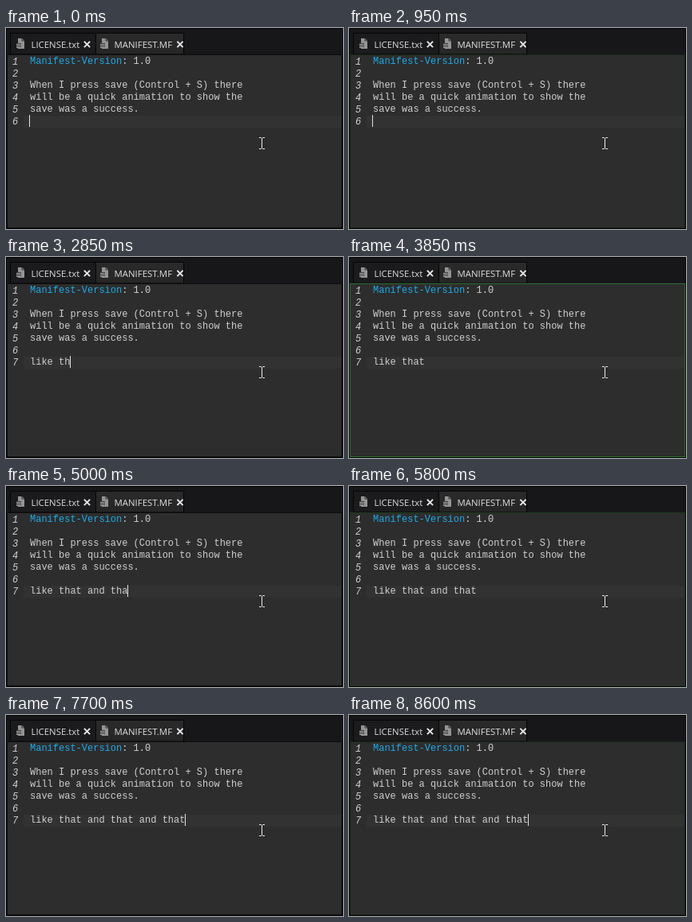
An HTML page for the animation above (8.65 s loop, 422 by 252 pixels).

```html
<!DOCTYPE html>
<html lang="en">
<head>
<meta charset="utf-8">
<title>Save animation</title>
<style>
  html, body { margin: 0; width: 100%; height: 100%; overflow: hidden; background: #111; }
  svg { display: block; width: 422px; height: 252px; }
  text { white-space: pre; }
  .code { font: 12px "Liberation Mono", "Courier New", monospace; fill: #cfcfcf; }
  .key { fill: #1fa9e6; }
  .num { font: italic 12px "Liberation Mono", "Courier New", monospace; fill: #d0d0d0; }
  .tab { font: 11.4px "Open Sans", "Noto Sans", sans-serif; fill: #dedede; }
</style>
</head>
<body>
<svg viewBox="0 0 422 252" xmlns="http://www.w3.org/2000/svg">
  <defs>
    <linearGradient id="tabFill" x1="0" y1="0" x2="0" y2="1">
      <stop offset="0" stop-color="#2b2a2b"/>
      <stop offset="1" stop-color="#272627"/>
    </linearGradient>
    <g id="doc">
      <path d="M2 0H7L10 3V13H2Z" fill="#949494"/>
      <path d="M7 0V3H10" fill="none" stroke="#333"/>
      <path d="M0 6.5H6M0 8.5H6M0 10.5H6" stroke="#333"/>
      <path d="M0 7.5H5M0 9.5H5M0 11.5H5" stroke="#b0b0b0"/>
    </g>
    <path id="close" d="M-3.6 -3.6L3.6 3.6M3.6 -3.6L-3.6 3.6" stroke="#e6e6e6" stroke-width="2"/>
  </defs>

  <rect width="422" height="252" fill="#17171a"/>
  <path d="M5.5 33V6.5H112.5V33Z" fill="#1b1b1d" stroke="#050505"/>
  <path d="M112.5 33V6.5H222.5V33Z" fill="url(#tabFill)" stroke="#050505"/>
  <use href="#doc" x="13" y="13"/>
  <use href="#doc" x="118" y="13"/>
  <text class="tab" x="31.5" y="24.5">LICENSE.txt</text>
  <text class="tab" x="135.5" y="24.5">MANIFEST.MF</text>
  <use href="#close" x="101.5" y="20.5"/>
  <use href="#close" x="218" y="20.5"/>

  <rect x="1" y="33" width="420" height="218" fill="#2d2d2d"/>
  <rect id="row" x="22" width="398" height="15" fill="#323232"/>
  <g id="nums"></g>
  <text class="code" x="30" y="45"><tspan class="key">Manifest-Version</tspan>: 1.0</text>
  <text class="code" x="30" y="75">When I press save (Control + S) there</text>
  <text class="code" x="30" y="90">will be a quick animation to show the</text>
  <text class="code" x="30" y="105">save was a success.</text>
  <text class="code" id="typed" x="30" y="135"></text>
  <rect id="caret" width="1" height="15" fill="#e4e4e4"/>

  <rect x=".5" y=".5" width="421" height="251" fill="none" stroke="#060606"/>
  <rect x="1.5" y="33.5" width="419" height="217" fill="none" stroke="#0c0c0c"/>
  <rect id="glow" x="1.5" y="33.5" width="419" height="217" fill="none" stroke="#348238"/>

  <path d="M317 137.5H319.5L320.5 138.5L321.5 137.5H324M320.5 138V151M317 151.5H319.5L320.5 150.5L321.5 151.5H324"
        fill="none" stroke="#eee"/>
</svg>
<script>
const LOOP = 8650, TICK = 50, CHAR = 7.2, BLINK = 500, ENTER = 1950;
const PHRASE = "like that and that and that";
// time at which each character of the phrase is typed
const KEYS = [
  2200, 2300, 2400, 2500, 2650, 2750, 2850, 2950, 3100,
  4300, 4400, 4550, 4650, 4750, 4850, 4900, 5000, 5100,
  6350, 6550, 6700, 6800, 6900, 7000, 7100, 7250, 7450
];
const SAVES = [900, 3550, 5700, 8100], SAVE_TIME = 650, PEAK = 0.4;

const el = id => document.getElementById(id);
const set = (id, attr, value) => el(id).setAttribute(attr, value);

for (let n = 1; n <= 7; n++) {
  const label = document.createElementNS("http://www.w3.org/2000/svg", "text");
  label.setAttribute("class", "num");
  label.setAttribute("x", 8);
  label.setAttribute("y", 31 + n * 15);
  label.textContent = n;
  el("nums").append(label);
}

function saveLevel(t) {
  const start = SAVES.find(s => t >= s && t < s + SAVE_TIME);
  if (start === undefined) return 0;
  const u = (t - start) / SAVE_TIME;
  return u < PEAK ? u / PEAK : ((1 - u) / (1 - PEAK)) ** 1.7;
}

function caretOn(t, count) {
  const lastKey = count ? KEYS[count - 1] : t >= ENTER ? ENTER : -250;
  return Math.floor((t - lastKey) / BLINK) % 2 === 0;
}

function draw(time) {
  const t = Math.floor((time % LOOP) / TICK) * TICK;
  const count = KEYS.filter(k => k <= t).length;
  const line = t < ENTER ? 6 : 7;
  const top = 20 + line * 15;

  el("typed").textContent = PHRASE.slice(0, count);
  el("nums").lastChild.setAttribute("opacity", line === 7 ? 1 : 0);
  set("row", "y", top);
  set("caret", "x", Math.floor(29.6 + count * CHAR));
  set("caret", "y", top - 1);
  set("caret", "opacity", caretOn(t, count) ? 1 : 0);
  set("glow", "opacity", saveLevel(t));
}

const began = performance.now();
function frame() {
  draw(performance.now() - began);
  requestAnimationFrame(frame);
}
frame();
</script>
</body>
</html>
```
